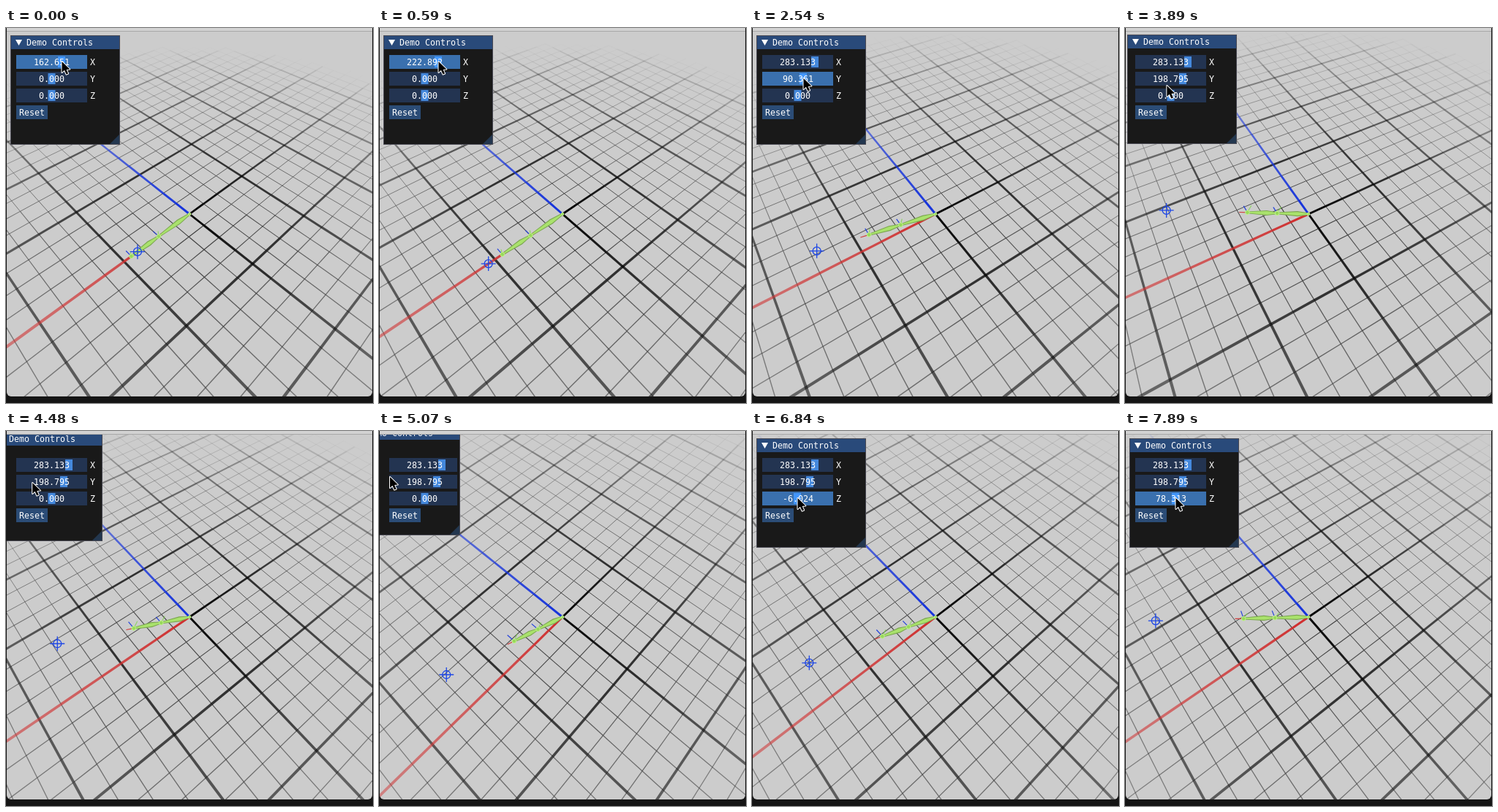
Animation of 502x514 px, one loop 8 s. Source, as an HTML page with a canvas:

```html
<!DOCTYPE html>
<html lang="en">
<head>
<meta charset="utf-8">
<title>Demo Controls</title>
<style>
  html, body { margin: 0; width: 100%; height: 100%; overflow: hidden; background: #151515; }
  canvas { display: block; }
</style>
</head>
<body>
<canvas id="stage" width="502" height="514"></canvas>
<script>
const ctx = document.getElementById('stage').getContext('2d');
const LOOP = 8000, STEP = 148.87;    // the picture advances in steps
const CX = 251, CY = 255, FOCAL = 440, DIST = 800;
const MINOR = 50, MAJOR = 200, RADIUS = 1000;
const UNIT = 500 / 83;               // slider value per half pixel
const RAD = Math.PI / 180;

const span = (n, a, b) => Math.min(Math.max(n, a), b) - a;
const ramp = (n, a, b) => span(n, a, b) / (b - a);
const mix = (p, q, f) => p.map((v, i) => v + (q[i] - v) * f);

// Slider positions at step n, in half pixels from the centre
const sliders = n => [
  27 + 20 * ramp(n, 0, 8),
  33 * ramp(n, 12.8, 22),
  14 * (span(n, 46, 48) + span(n, 50, 52.4)) / 4.4 - ramp(n, 43, 45)
].map(Math.round);

const pull = n => [-45, -17].map(v => v * ramp(n, 25.5, 34));

function cursorAt(n) {
  const [onX, onY, onZ] = sliders(n).map((v, row) => [63 + v / 2, 46 + 23 * row]);
  const [dx, dy] = pull(n);
  let p = mix(onX, onY, ramp(n, 9, 12));
  p = mix(p, [60 + dx, 80 + dy], ramp(n, 22, 23));
  return mix(p, onZ, ramp(n, 36, 43));
}

function makeCamera(n) {
  const spin = span(n, 0, 22) + span(n, 35, 48) + span(n, 50, 53);
  const orbit = ramp(n, 26, 34);
  const yaw = (43.8 - 0.64 * spin + 18.1 * orbit) * RAD;
  const pitch = (49.3 + 0.18 * span(n, 0, 22) + 9.3 * orbit) * RAD;
  const cy = Math.cos(yaw), sy = Math.sin(yaw), cp = Math.cos(pitch), sp = Math.sin(pitch);
  return (x, y, z) => {
    const side = -x * cy - z * sy, near = x * sy - z * cy;
    const depth = 1 - (near * cp + y * sp) / DIST, k = FOCAL / DIST / depth;
    return { x: CX + side * k, y: CY + (near * sp - y * cp) * k, depth };
  };
}

function line(a, b, color, width) {
  ctx.strokeStyle = color;
  ctx.lineWidth = width;
  ctx.beginPath();
  ctx.moveTo(a.x, a.y);
  ctx.lineTo(b.x, b.y);
  ctx.stroke();
}

function shape(points, fill) {
  ctx.beginPath();
  points.forEach(([x, y]) => ctx.lineTo(x, y));
  ctx.closePath();
  ctx.fillStyle = fill;
  ctx.fill();
}

function rect(x, y, w, h, fill) {
  ctx.fillStyle = fill;
  ctx.fillRect(x, y, w, h);
}

// One grid line, fading with the distance from the origin
function gridLine(project, offset, alongX, rgb, width, from = -RADIUS, to = RADIUS) {
  const p = v => alongX ? project(v, 0, offset) : project(offset, 0, v);
  for (let s = from; s < to; s += MINOR) {
    const fade = 1 - Math.hypot(offset, s + MINOR / 2) / RADIUS;
    if (fade <= 0) continue;
    const a = p(s), b = p(s + MINOR);
    line(a, b, `rgba(${rgb},${fade})`, width * 2 / (a.depth + b.depth));
  }
}

function drawGrid(project) {
  for (const major of [false, true]) {
    for (let o = -RADIUS; o <= RADIUS; o += MINOR) {
      if ((o % MAJOR === 0) !== major || o === 0) continue;
      for (const alongX of [true, false])
        gridLine(project, o, alongX, major ? '10,10,10' : '50,50,50', major ? 2.9 : 1);
    }
  }
  for (const alongX of [true, false]) {
    gridLine(project, 0, alongX, '0,0,0', 2.8, -RADIUS, 0);
    gridLine(project, 0, alongX, alongX ? '208,45,45' : '20,50,220', 3, 0, RADIUS);
  }
}

function bone(a, b) {
  const dx = b.x - a.x, dy = b.y - a.y, len = Math.hypot(dx, dy);
  const p = (f, w) => [a.x + dx * f - dy / len * w, a.y + dy * f + dx / len * w];
  const kite = (end, mid, fill) =>
    shape([p(0, end), p(.35, mid), p(1, end), p(1, -end), p(.35, -mid), p(0, -end)], fill);
  kite(1.4, 3.6, '#7ba64f');
  kite(.7, 2.4, '#a9e26c');
}

function dot(p, r) {
  ctx.beginPath();
  ctx.arc(p.x, p.y, r, 0, 7);
  ctx.fillStyle = '#98d85c';
  ctx.fill();
  ctx.strokeStyle = '#c2f58c';
  ctx.lineWidth = 1;
  ctx.stroke();
}

function drawArm(project, target) {
  const len = Math.hypot(...target), dir = target.map(v => v / len);
  const flat = Math.hypot(dir[0], dir[2]);
  const up = [-dir[0] * dir[1] / flat, flat, -dir[2] * dir[1] / flat];
  const back = [-dir[2] / flat, 0, dir[0] / flat];
  const reach = (r, d = dir, l = 0) => project(...dir.map((v, i) => v * r + d[i] * l));
  const joints = [0, 100, 180];
  for (const r of joints.slice(1)) {
    line(reach(r), reach(r, dir, 20), '#d03c3c', 1.2);
    line(reach(r), reach(r, up, 20), 'rgba(125,215,70,.75)', 1.2);
    line(reach(r), reach(r, back, 20), '#2040dc', 1.2);
  }
  const [root, elbow, tip] = joints.map(r => reach(r));
  bone(root, elbow);
  bone(elbow, tip);
  dot(root, 1.8);
  dot(elbow, 2.8);
  dot(tip, 2.8);
}

function drawTarget({ x, y }) {
  const blue = '#1c46e6';
  line({ x: x - 10, y }, { x: x + 10, y }, blue, 1.3);
  line({ x, y: y - 10 }, { x, y: y + 10 }, blue, 1.3);
  ctx.beginPath();
  ctx.arc(x, y, 5.5, 0, 7);
  ctx.stroke();
}

function text(str, x, y) {
  ctx.fillStyle = '#fff';
  ctx.fillText(str, x, y);
}

function slider(label, top, value, active) {
  rect(14, top, 97, 19, active ? '#3a70ae' : '#233451');
  rect(57.5 + value / 2, top + 2, 10, 15, active ? '#4296fa' : '#4488dc');
  const str = (value * UNIT).toFixed(3);
  text(str, Math.round(62.5 - str.length * 3.5), top + 14);
  text(label, 115, top + 14);
}

function drawPanel(n) {
  const [dx, dy] = n < 36 ? pull(n).map(Math.round) : [0, 0];
  const x = 6 + dx, y = 10 + dy;
  ctx.font = '11.63px "DejaVu Sans Mono", monospace';
  rect(x, y, 150, 150, '#191919');
  rect(x, y, 150, 19, '#294a7a');
  shape([[x + 7, y + 6], [x + 16, y + 6], [x + 11.5, y + 14]], '#fff');
  text('Demo Controls', x + 22, y + 14);
  shape([[x + 149, y + 149], [x + 136, y + 149], [x + 149, y + 136]], '#23374f');
  ctx.strokeStyle = '#4a4a54';
  ctx.lineWidth = 1;
  ctx.strokeRect(x + .5, y + .5, 149, 149);

  // The widgets stay put while the window around them is pulled
  ctx.save();
  ctx.beginPath();
  ctx.rect(x + 4, y + 19, 142, 127);
  ctx.clip();
  const active = [n <= 9, n >= 12 && n <= 22, n >= 43];
  sliders(n).forEach((v, row) => slider('XYZ'[row], 37 + 23 * row, v, active[row]));
  rect(14, 106, 43, 19, '#2b4c76');
  text('Reset', 18, 120);
  ctx.restore();
}

const arrow = new Path2D('M0 0V15L3.4 11.8L6 17.6L8.6 16.5L6.1 10.9L10.8 10.6Z');

function drawCursor([x, y]) {
  ctx.save();
  ctx.translate(x, y);
  ctx.lineJoin = 'round';
  ctx.lineWidth = 2;
  ctx.strokeStyle = '#fff';
  ctx.stroke(arrow);
  ctx.fillStyle = '#000';
  ctx.fill(arrow);
  ctx.restore();
}

function draw(n) {
  const project = makeCamera(n);
  const target = sliders(n - 0.6).map(v => v * UNIT);   // trails the sliders a little

  rect(0, 0, 502, 514, '#151515');
  ctx.save();
  ctx.beginPath();
  ctx.roundRect(1, -10, 500, 515, 6);
  ctx.clip();
  rect(0, 0, 502, 514, '#cccccc');
  rect(0, 0, 502, 4, '#d2d2d2');
  rect(0, 4, 502, 1, '#a8a8a8');
  ctx.beginPath();
  ctx.rect(0, 5, 502, 505);
  ctx.clip();
  drawGrid(project);
  drawArm(project, target);
  drawTarget(project(...target));
  drawPanel(n);
  drawCursor(cursorAt(n));
  ctx.restore();
}

let shown = -1;
function tick() {
  const n = Math.floor((performance.now() % LOOP + 12) / STEP);
  if (n !== shown) draw(shown = n);
  requestAnimationFrame(tick);
}
tick();
</script>
</body>
</html>
```
